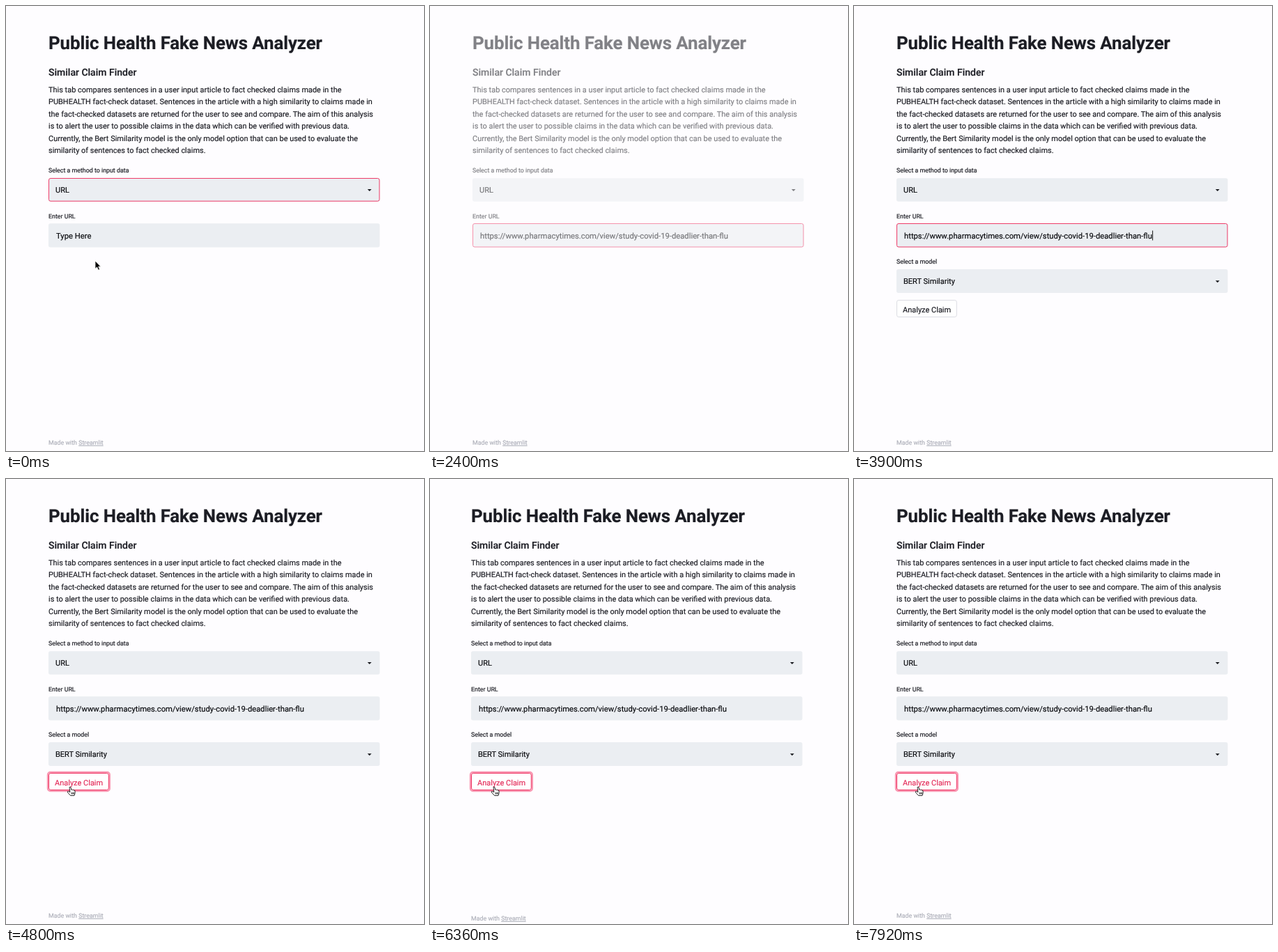
Animation, 600 px wide and 639 px high, one loop 8000 ms. Source, as an HTML page:

```html
<!DOCTYPE html>
<html lang="en">
<head>
<meta charset="utf-8">
<title>Public Health Fake News Analyzer</title>
<style>
  html, body { margin: 0; width: 100%; height: 100%; overflow: hidden; background: #fefdff; }
  svg { display: block; width: 600px; height: 639px; }
  text {
    font: 11px Roboto, "Noto Sans", sans-serif; text-rendering: geometricPrecision; white-space: pre;
    color: #1c1d24; fill: currentColor; stroke: currentColor; stroke-width: .18px;
  }
  .title { font-size: 25.9px; font-weight: 700; letter-spacing: -0.11px; }
  .heading { font-size: 14px; font-weight: 500; }
  #intro text { font-size: 10.96px; }
  .label, .note { font-size: 8.85px; }
  .note { color: #adafb9; }
  .value { color: #0b0c10; }
  #inputText { font-size: 11.25px; }
  .field { fill: #ebeef2; }
  .focus { fill: none; stroke: #ee3c69; }
</style>
</head>
<body>
<svg viewBox="0 0 600 639">
  <defs>
    <path id="chevron" d="M518.9 263h5.8l-2.9 3z" fill="#17181d"/>
  </defs>

  <g id="page">
    <text class="title" x="61" y="61.5">Public Health Fake News Analyzer</text>
    <text class="heading" x="61" y="99.8">Similar Claim Finder</text>
    <g id="intro"></g>

    <text class="label" x="61" y="239">Select a method to input data</text>
    <rect class="field" x="61" y="247.3" width="475.5" height="33.4" rx="2.7"/>
    <rect class="focus" id="methodFocus" x="61.5" y="247.5" width="474.5" height="32.7" rx="2.5"/>
    <text class="value" x="71" y="268">URL</text>
    <use href="#chevron"/>

    <text class="label" x="61" y="304.8">Enter URL</text>
    <rect class="field" x="61" y="312.3" width="475.5" height="34.2" rx="2.7"/>
    <rect class="focus" id="inputFocus" x="61.5" y="312.5" width="474.5" height="33.5" rx="2.5"/>
    <text class="value" id="inputText" x="72" y="333.6"></text>
    <rect id="caret" y="322.5" width="1" height="14" fill="#111"/>
    <text class="note" id="hint" x="532.5" y="342.7" text-anchor="end">Press Enter to apply</text>

    <g id="model">
      <text class="label" x="61" y="370">Select a model</text>
      <rect class="field" x="61" y="378" width="475.5" height="34" rx="2.7"/>
      <text class="value" x="71" y="399.2">BERT Similarity</text>
      <use href="#chevron" y="131.3"/>
      <rect id="ring" x="59.9" y="420.9" width="89" height="27.2" rx="3.8" fill="none" stroke="#f63366" stroke-opacity=".5" stroke-width="2.2"/>
      <rect id="button" x="61.5" y="422.5" width="85.8" height="24" rx="2.6" fill="#fff"/>
      <text id="buttonText" x="70" y="439.5">Analyze Claim</text>
    </g>
  </g>

  <g id="footer">
    <text class="note" x="61" y="630">Made with <tspan text-decoration="underline">Streamlit</tspan></text>
  </g>

  <g id="cursor">
    <path id="arrow" d="M0 0V11.3L2.6 8.9 4.5 13.2 6.5 12.3 4.7 8.2H8Z" fill="#000" stroke="#fff" stroke-width=".8"/>
    <path id="beam" d="M-2.5-6Q0-6 0-4.5Q0-6 2.5-6M0-4.5V4.5M-2.5 6Q0 6 0 4.5Q0 6 2.5 6M-1.2 1.8H1.2" fill="none" stroke="#222"/>
    <path id="hand" d="M-1 .7Q0-.7 1 .7L1.7 4.3Q2.6 3.4 3.5 4.5Q4.5 3.7 5.3 4.9Q6.6 4.3 7 6L7.1 9.2L6 12.6H.6L-3.4 8.1Q-4.4 6.2-2.3 6.4L-.1 7.8ZM2.2 8V10.7M3.9 8V10.7M5.4 8V10.7" fill="#fff" stroke="#111" stroke-width=".9" stroke-linejoin="round"/>
  </g>
</svg>

<script>
const LOOP = 8000;
const URL_TEXT = "https://www.pharmacytimes.com/view/study-covid-19-deadlier-than-flu";
const INTRO = [
  "This tab compares sentences in a user input article to fact checked claims made in the",
  "PUBHEALTH fact-check dataset. Sentences in the article with a high similarity to claims made in",
  "the fact-checked datasets are returned for the user to see and compare. The aim of this analysis",
  "is to alert the user to possible claims in the data which can be verified with previous data.",
  "Currently, the Bert Similarity model is the only model option that can be used to evaluate the",
  "similarity of sentences to fact checked claims."
];

const $ = id => document.getElementById(id);
const show = (id, visible) => { $(id).style.display = visible ? "" : "none"; };
const set = (id, name, value) => $(id).setAttribute(name, value);
const between = (t, start, end) => t >= start && t < end;
const ramp = (t, start, end) => Math.min(1, Math.max(0, (t - start) / (end - start)));
const smooth = x => x * x * (3 - 2 * x);
const mix = (a, b, k) => a + (b - a) * k;

$("intro").innerHTML = INTRO
  .map((line, i) => `<text x="61" y="${124 + i * 17.45}">${line}</text>`).join("");

// The page dims while the app reruns, then comes back quickly.
const dim = (t, start, restore) =>
  0.48 * smooth(ramp(t, start, start + 780)) * (1 - ramp(t, restore, restore + 300));

function drawCursor(t) {
  const first = smooth(ramp(t, 0, 440));
  const second = smooth(ramp(t, 4140, 4440));
  const leaving = t >= 4140;
  const x = leaving ? mix(112.5, 92, second) : mix(128, 112.5, first);
  const y = leaving ? mix(329.5, 442, second) : mix(366, 329.5, first);
  const overInput = y < 347;
  const overButton = y >= 423;
  show("cursor", t < 1560 || leaving);
  show("beam", overInput);
  show("hand", overButton);
  show("arrow", !overInput && !overButton);
  set("cursor", "transform", `translate(${x} ${y})`);
  return overButton;
}

function draw(t) {
  const pasted = t >= 840;
  const hovering = drawCursor(t);

  set("methodFocus", "opacity", 1 - ramp(t, 440, 600));
  set("inputFocus", "opacity", ramp(t, 440, 600) * (1 - ramp(t, 4480, 4620)));

  $("inputText").textContent = pasted ? URL_TEXT : "Type Here";
  show("hint", between(t, 840, 1560));
  show("caret", between(t, 540, 4480) && (!pasted || Math.floor((t - 840) / 300) % 2 === 0));
  set("caret", "x", 72.2 + $("inputText").getComputedTextLength());

  show("model", t >= 3840);
  set("ring", "opacity", ramp(t, 4480, 4620));
  set("button", "stroke", hovering ? "#ee315f" : "#dcdde3");
  $("buttonText").style.color = hovering ? "#e42f5c" : "";

  set("page", "opacity", 1 - dim(t, 1740, 2940) - dim(t, 4800, 5700));

  // A scroll bar briefly narrows the page.
  const narrowed = between(t, 5760, 6960);
  set("page", "transform", narrowed ? "translate(-2 0)" : "");
  set("footer", "transform", narrowed ? "translate(-2 4)" : "");
}

const startTime = performance.now();
function tick() {
  draw((performance.now() - startTime) % LOOP);
  requestAnimationFrame(tick);
}
tick();
</script>
</body>
</html>
```
